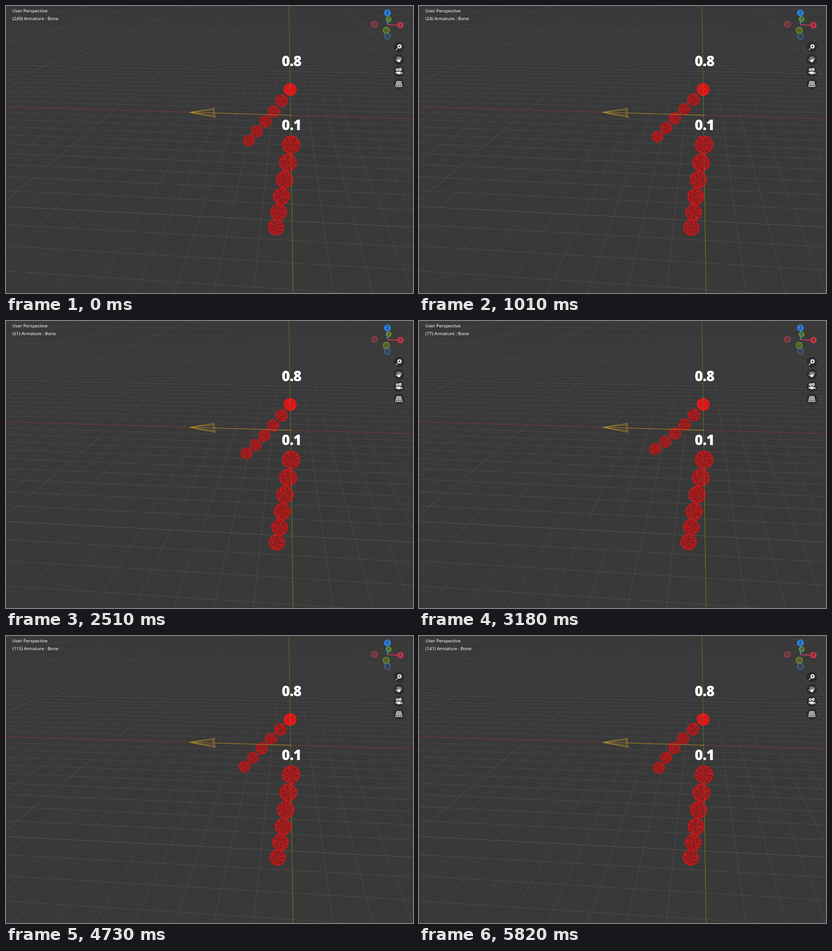
Recreate the animation shown at these times as an HTML page. Size 891 by 629 pixels, loop 5.85 s.

```html
<!DOCTYPE html>
<html lang="en">
<head>
<meta charset="utf-8">
<title>Armature chains</title>
<style>
  html, body { margin: 0; width: 100%; height: 100%; overflow: hidden; background: #393939; }
  svg { display: block; width: 891px; height: 629px; }
  .info { font: 9.8px "Noto Sans", "Open Sans", sans-serif; fill: #fff; }
  .value { font: 800 31px "Open Sans", "Noto Sans", sans-serif; font-stretch: 75%; letter-spacing: -.8px; fill: #fff; text-anchor: middle; }
  .axis { font: 9px "Noto Sans", sans-serif; fill: #181818; text-anchor: middle; }
  .icon { fill: none; stroke: #e6e6e6; stroke-width: 1.3; stroke-linecap: round; stroke-linejoin: round; }
</style>
</head>
<body>
<svg viewBox="0 0 891 629">
  <defs>
    <linearGradient id="minor" gradientUnits="userSpaceOnUse" x1="0" y1="25" x2="0" y2="330">
      <stop offset="0" stop-color="#4c4c4c" stop-opacity="0"/>
      <stop offset=".35" stop-color="#4c4c4c" stop-opacity=".5"/>
      <stop offset="1" stop-color="#4c4c4c"/>
    </linearGradient>
    <linearGradient id="major" gradientUnits="userSpaceOnUse" x1="0" y1="-20" x2="0" y2="300">
      <stop offset="0" stop-color="#525252" stop-opacity=".2"/>
      <stop offset=".5" stop-color="#525252" stop-opacity=".8"/>
      <stop offset="1" stop-color="#555"/>
    </linearGradient>
  </defs>
  <rect width="891" height="629" fill="#393939"/>
  <g fill="none" stroke-width="1">
    <path id="minorGrid" stroke="url(#minor)"/>
    <path id="majorGrid" stroke="url(#major)"/>
    <path d="M0 220.7L891 247.3" stroke="#8b353b"/>
    <path d="M619.5 0L628.5 629" stroke="#617c22"/>
  </g>
  <g id="balls"></g>
  <path d="M622 168V198M624 316L628.5 629" stroke="#758a20" opacity=".55"/>
  <g fill="none" stroke="#a88a2b" stroke-width="1.1">
    <path d="M401 233L456 224.5L457.500 244ZM401 233L453.500 228V240ZM456 224.5L453.500 228M457.500 244L453.500 240M401 233L458 234.500L623 239.500"/>
    <circle cx="623" cy="239.500" r="1.3" fill="#a88a2b" stroke="none"/>
  </g>
  <text class="value" x="625" y="132">0.8</text>
  <text class="value" x="625" y="272">0.1</text>
  <text class="info" x="14" y="14">User Perspective</text>
  <text class="info" id="label" x="14" y="30.500"></text>

  <g id="gizmo" stroke-width="1.2">
    <path d="M835 41L837.500 29" stroke="#668c1c" stroke-width="2"/>
    <circle cx="837.500" cy="29" r="6.500" fill="#638a1d"/>
    <text class="axis" x="837.500" y="32.300">Y</text>
    <path d="M835 41L857 42" stroke="#c8384f" stroke-width="2"/>
    <path d="M835 41V22" stroke="#3480d6" stroke-width="2"/>
    <circle cx="835" cy="15" r="7.500" fill="#2f7fdc"/>
    <text class="axis" x="835" y="18.300">Z</text>
    <circle cx="863.500" cy="42" r="7.200" fill="#c1364c"/>
    <text class="axis" x="863.500" y="45.300">X</text>
    <circle cx="806.500" cy="40.300" r="6.700" fill="#663b42" stroke="#c03c50"/>
    <circle cx="832.500" cy="53.300" r="7" fill="#536329" stroke="#86a62b"/>
    <circle cx="835" cy="66.500" r="6.500" fill="#39434f" stroke="#4383cc"/>
  </g>

  <g fill="#2b2b2b">
    <circle cx="860" cy="90" r="11.500"/><circle cx="860" cy="117" r="11.500"/>
    <circle cx="860" cy="144" r="11.500"/><circle cx="860" cy="171" r="11.500"/>
  </g>
  <circle cx="861.500" cy="88.500" r="4.800" fill="#e6e6e6"/>
  <path class="icon" d="M857.500 92.500L853.500 96.500" stroke-width="2"/>
  <path d="M859 88.500H864M861.500 86V91" stroke="#2b2b2b" stroke-width="1.2"/>
  <path d="M856.500 118L864.500 116.500L863.500 121Q862 124 858.500 123Z" fill="#e6e6e6"/>
  <path class="icon" stroke-width="1.700" d="M857.500 119L856 112M859.800 117L859.500 110.800M862 117L863 111.500M864 118L866.300 113.500M857.500 121.500L853.300 117.500"/>
  <g fill="#e6e6e6">
    <circle cx="856.500" cy="139.500" r="3"/><circle cx="863" cy="139" r="3.200"/>
    <rect x="856" y="143.500" width="8" height="6" rx="1"/>
    <path d="M864.500 146L867.500 144V149.500L864.500 148ZM853 144L856 145V147L853 148Z"/>
  </g>
  <g fill="#2b2b2b"><circle cx="856.500" cy="139.500" r="1"/><circle cx="863" cy="139" r="1"/></g>
  <path class="icon" stroke-width="1.100" d="M855.500 165.500H864.500L867 176.500H853ZM854.800 169H865.300M854 172.500H866.200M858.500 165.500L857.600 176.500M861.500 165.500L862.400 176.500"/>
</svg>
<script>
const LOOP = 5850, NS = "http://www.w3.org/2000/svg";
const byId = id => document.getElementById(id);

function add(parent, tag, attrs) {
  const node = document.createElementNS(NS, tag);
  for (const key in attrs) node.setAttribute(key, attrs[key]);
  return parent.appendChild(node);
}

// Floor plane in perspective, origin at (623, 239.5), horizon at y = -90.
function project(x, y) {
  const w = 1 - .00363 * x + .0413 * y;
  return ((623 + 37.7 * x + 25.53 * y) / w).toFixed(1) + " " + (-90 + 329.5 / w).toFixed(1);
}

function drawGrid() {
  const paths = ["", ""];
  const line = (n, a, b) => { if (n) paths[n % 10 ? 0 : 1] += `M${a}L${b}`; };
  for (let x = -70; x <= 40; x++) line(x, project(x, -17), project(x, 75));
  for (let y = -15; y <= 75; y++) line(y, project(-80, y), project(40, y));
  byId("minorGrid").setAttribute("d", paths[0]);
  byId("majorGrid").setAttribute("d", paths[1]);
}

// Seeded so that the mesh gaps look the same on every load.
let seed = 7;
const random = () => (seed = seed * 16807 % 2147483647) / 2147483647;

function makeBall(r, bright) {
  const g = add(byId("balls"), "g", {});
  add(g, "circle", { r: r - .4, fill: bright ? "#ed1717" : "#bd1a1b", stroke: bright ? "#f51616" : "#cc1819", "stroke-width": 1 });
  const count = Math.round(r * r / 5.5);
  let gaps = "";
  for (let i = 0; i < count; i++) {
    const d = r * .86 * Math.sqrt((i + .5) / count), a = i * 2.4 + random() * .5;
    const turn = random() * Math.PI, len = .5 + random() * 1.1;
    const x = d * Math.cos(a), y = d * Math.sin(a);
    const dx = len * Math.cos(turn), dy = len * Math.sin(turn);
    gaps += `M${(x - dx).toFixed(1)} ${(y - dy).toFixed(1)}L${(x + dx).toFixed(1)} ${(y + dy).toFixed(1)}`;
  }
  add(g, "path", { d: gaps, stroke: bright ? "#a02020" : "#4a2526", "stroke-width": 1.3, "stroke-linecap": "round" });
  return g;
}

// Key poses: horizontal place of each joint below the fixed first ball.
const keys = [-1, 24, 43, 77, 94, 115, 141];
const chains = [
  { x: 622, y: 183, radii: [14, 13.7, 13.4, 13.2, 13, 12.8], bright: true,
    lengths: [30.6, 29.4, 28.4, 28.2, 27.1],
    poses: [
      [603.5, 601, 604, 602, 603, 600.5, 600],
      [586, 580.5, 587, 581.5, 584, 580, 578.5],
      [568, 560, 571, 560.5, 566.5, 560, 559],
      [550, 541, 554.5, 539, 550, 541, 541],
      [532, 522, 538, 517, 534, 522, 525]] },
  { x: 624, y: 304, radii: [20, 19.5, 19, 18.6, 18.2, 17.8],
    lengths: [40, 38, 37.1, 35.2, 33.5],
    poses: [
      [617, 617.5, 618.5, 617, 617.5, 618, 618],
      [610, 611.5, 613, 609, 611, 612.5, 612],
      [603, 606, 607.5, 602.5, 605, 607, 606.5],
      [597, 601, 602.5, 596, 599.5, 601, 600.5],
      [591, 596, 597, 590, 593, 595, 595]] }
];

// Cubic curve through the key poses.
function curve(values, frame) {
  const last = keys.length - 1;
  let k = 0;
  while (k < last - 1 && frame > keys[k + 1]) k++;
  const slope = i => {
    const a = Math.max(i - 1, 0), b = Math.min(i + 1, last);
    return (values[b] - values[a]) / (keys[b] - keys[a]);
  };
  const span = keys[k + 1] - keys[k], u = (frame - keys[k]) / span, v = 1 - u;
  return values[k] * v * v * (1 + 2 * u) + values[k + 1] * u * u * (3 - 2 * u)
    + span * u * v * (slope(k) * v - slope(k + 1) * u);
}

const place = (ball, x, y) => ball.setAttribute("transform", `translate(${x.toFixed(2)} ${y.toFixed(2)})`);

function render(ms) {
  const frame = Math.round(ms * .024324 - .567);
  byId("label").textContent = `(${frame < 1 ? frame + 250 : frame}) Armature : Bone`;
  for (const chain of chains) {
    let { x, y } = chain;
    place(chain.balls[0], x, y);
    chain.poses.forEach((pose, i) => {
      const next = curve(pose, frame);
      y += Math.sqrt(chain.lengths[i] ** 2 - (next - x) ** 2);
      x = next;
      place(chain.balls[i + 1], x, y);
    });
  }
}

drawGrid();
for (const chain of chains)
  chain.balls = chain.radii.map((r, i) => makeBall(r, chain.bright && i === 0));

const start = performance.now();
function tick() {
  render((performance.now() - start) % LOOP);
  requestAnimationFrame(tick);
}
render(0);
requestAnimationFrame(tick);
</script>
</body>
</html>
```
